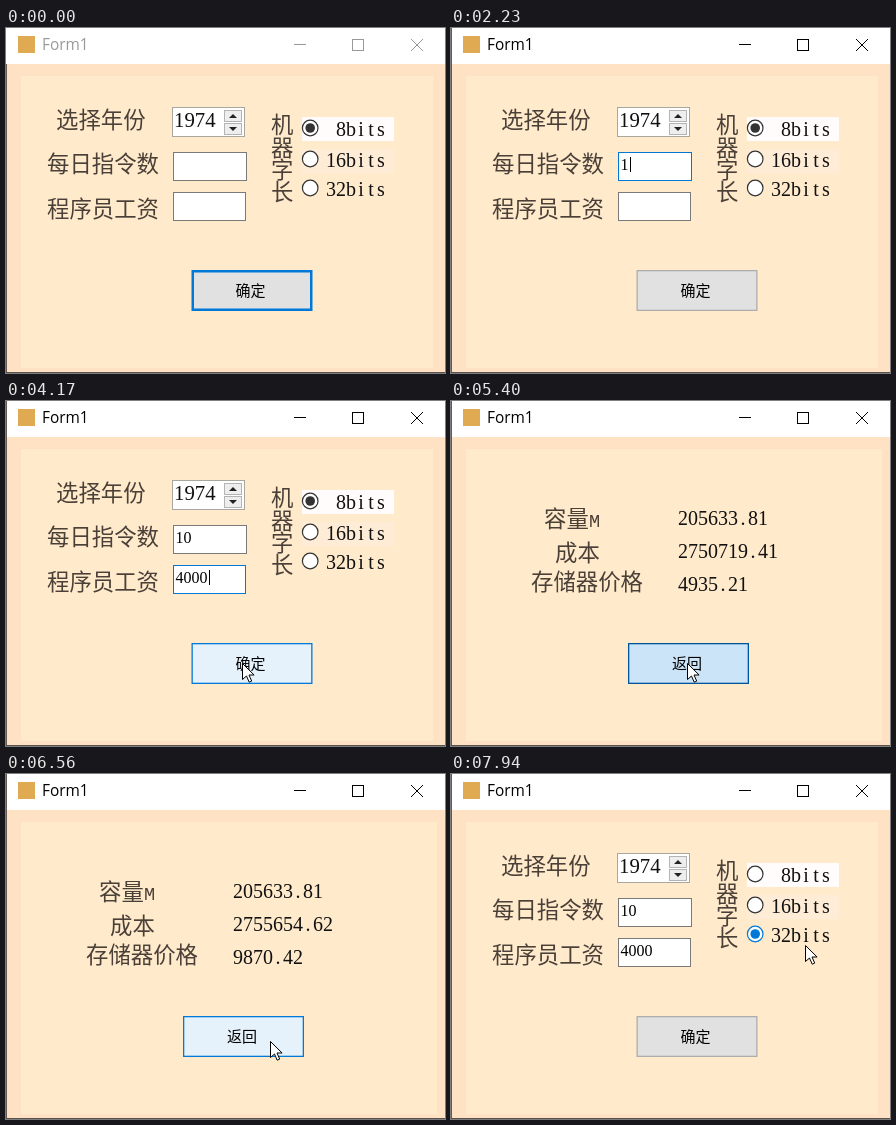
These frames come from a looping animation (439 px wide and 345 px high, 8 s). An HTML page with a canvas:

```html
<!DOCTYPE html>
<html lang="zh">
<head>
<meta charset="utf-8">
<title>Form1</title>
<style>
html, body { margin: 0; width: 100%; height: 100%; overflow: hidden; background: #ffe1c4; }
canvas { display: block; }
</style>
</head>
<body>
<canvas id="stage" width="439" height="345"></canvas>
<script>
const ctx = document.getElementById('stage').getContext('2d');
const LOOP = 8000, TICK = 77.2;
const CJK = '"Noto Sans CJK SC", "Noto Sans CJK", sans-serif';
const MONO = '"Liberation Mono", monospace';
const SERIF = '"Liberation Serif", serif';
const INK = '#4b4038', BLUE = '#0078d7';

// Pointer path: [tick, x, y], eased between neighbours.
const path = [
  [2, 290, 346], [11, 212, 138], [32, 212, 138], [36, 197, 187], [40, 196, 189],
  [47, 196, 189], [54, 236, 262], [71, 236, 262], [75, 340, 148], [77, 345, 135],
  [79, 345, 135], [83, 264, 267], [96, 264, 267], [100, 354, 171]
];

function pointerAt(tick) {
  const next = path.findIndex(p => p[0] > tick);
  if (next < 0) return path[path.length - 1].slice(1);
  if (next === 0) return path[0].slice(1);
  const [t0, x0, y0] = path[next - 1], [t1, x1, y1] = path[next];
  const u = (tick - t0) / (t1 - t0), e = u * u * (3 - 2 * u);
  return [x0 + (x1 - x0) * e, y0 + (y1 - y0) * e];
}

const between = (v, from, to) => v >= from && v < to;
const inside = ([px, py], x, y, w, h) => between(px, x, x + w) && between(py, y, y + h);

function rect(x, y, w, h, fill) {
  ctx.fillStyle = fill;
  ctx.fillRect(x, y, w, h);
}

function frame(x, y, w, h, fill, border, line = 1) {
  rect(x, y, w, h, border);
  rect(x + line, y + line, w - 2 * line, h - 2 * line, fill);
}

function text(str, x, baseline, size, family, color = '#111', weight = 400) {
  ctx.font = `${weight} ${size}px ${family}`;
  ctx.fillStyle = color;
  ctx.fillText(str, x, baseline);
}

// Half-width serif letters, each centred in a cell of equal width.
function cells(str, x, baseline, pitch, color) {
  ctx.textAlign = 'center';
  [...str].forEach((ch, i) => text(ch, x + (i + 0.5) * pitch, baseline, pitch * 2, SERIF, color));
  ctx.textAlign = 'left';
}

const label = (str, x, middle) => text(str, x, middle + 8.4, 22.4, CJK, INK, 300);

function shape(points, fill, stroke) {
  ctx.beginPath();
  points.forEach(([x, y]) => ctx.lineTo(x, y));
  ctx.closePath();
  ctx.fillStyle = fill;
  ctx.fill();
  if (stroke) {
    ctx.strokeStyle = stroke;
    ctx.lineWidth = 1;
    ctx.stroke();
  }
}

function titleBar(active) {
  const color = active ? '#000' : '#999';
  rect(0, 0, 439, 36, '#fff');
  rect(12, 8, 17, 17, '#dfaa52');
  text('Form1', 36, 22, 15.4, '"Open Sans", sans-serif', color);
  rect(288, 16, 12, 1, color);
  frame(346, 11, 12, 12, '#fff', color);
  ctx.strokeStyle = color;
  ctx.lineWidth = 1;
  ctx.beginPath();
  ctx.moveTo(405, 11); ctx.lineTo(417, 23);
  ctx.moveTo(417, 11); ctx.lineTo(405, 23);
  ctx.stroke();
}

function button(caption, x, pointer, pressed, isDefault) {
  const hover = pointer && inside(pointer, x, 242, 121, 41);
  const [fill, border, line] =
    pressed ? ['#cce4f7', '#005499', 1.3] :
    hover ? ['#e5f1fb', BLUE, 1.3] :
    isDefault ? ['#e1e1e1', BLUE, 2.5] : ['#e1e1e1', '#adadad', 1.3];
  frame(x, 242, 121, 41, fill, border, line);
  text(caption, x + 44, 268.3, 15, CJK, '#000', 500);
}

function textBox(y, w, value, focused, caretOn) {
  frame(167, y, w, 29, '#fff', focused ? BLUE : '#7a7a7a');
  cells(value, 169.5, y + 17.5, 8, '#000');
  if (caretOn) rect(Math.round(170.5 + value.length * 8), y + 5, 1, 15, '#000');
}

function yearSpinner() {
  frame(166, 79, 73, 30, '#fff', '#a9a59f');
  cells('1974', 168, 99, 10.4);
  for (const [y, dir] of [[82, -1], [95, 1]]) {
    frame(218, y, 18, 12, '#eeeeee', '#b4b4b4');
    const mid = y + 6;
    shape([[223, mid - 2 * dir], [231, mid - 2 * dir], [227, mid + 2 * dir]], '#222');
  }
}

function radio(y, caption, dot, hover) {
  const color = hover ? BLUE : '#333';
  ctx.beginPath();
  ctx.arc(304.2, y, 7.8, 0, 7);
  ctx.fillStyle = '#fff';
  ctx.fill();
  ctx.strokeStyle = color;
  ctx.lineWidth = 1.2;
  ctx.stroke();
  if (dot) {
    ctx.globalAlpha = dot;
    ctx.beginPath();
    ctx.arc(304.2, y, 4.8, 0, 7);
    ctx.fillStyle = color;
    ctx.fill();
    ctx.globalAlpha = 1;
  }
  cells(caption, 320, y + 8, 10);
}

function inputPage(tick, pointer) {
  const focus = between(tick, 13, 36) ? 1 : between(tick, 36, 59) ? 2 : 0;
  const caret1 = between(tick, 13, 22) || between(tick, 29, 36);
  const caret2 = between(tick, 37, 59);
  const typed = (str, start) => str.slice(0, Math.max(0, tick - start + 1));

  label('选择年份', 50, 92);
  label('每日指令数', 41, 135.5);
  label('程序员工资', 41, 181);
  yearSpinner();
  textBox(124, 74, typed('10', 29), focus === 1, caret1);
  textBox(164, 73, typed('4000', 43), focus === 2, caret2);

  [...'机器字长'].forEach((ch, i) => label(ch, 265, 97 + i * 22.2));
  rect(296, 89, 92, 24, '#fffcfb');
  rect(296, 121, 92, 24, '#ffecd6');
  const selected = tick < 79 ? 0 : tick < 102 ? 1 : 2;
  [100, 131, 160].forEach((y, i) => {
    const fading = tick === 102 && i > 0;
    const hover = pointer && inside(pointer, 296, [88, 119, 147][i], 92, 26);
    radio(y, [' 8bits', '16bits', '32bits'][i], fading ? 0.5 : +(i === selected), hover);
  });
  button('确定', 185.5, pointer, tick === 58 || tick === 84, tick < 13);
}

function resultPage(tick, pointer) {
  const bits = tick < 75 ? 8 : 16;
  const capacity = 4080 * Math.exp(0.28 * 14);
  const price = 0.003 * bits * capacity;
  const cost = capacity / 300 * 4000 + 4000 + price;
  label('容量', 93, 118);
  text('M', 138, 126, 18.6, MONO, INK);
  label('成本', 104, 152);
  label('存储器价格', 80, 181);
  [capacity, cost, price].forEach((v, i) => cells(v.toFixed(2), 227, 124 + i * 33, 10));
  button('返回', 177, pointer, tick === 70 || tick === 95);
}

function arrow(x, y) {
  const outline = [[0, 0], [0, 16], [4, 12.5], [6.7, 18.7], [9.2, 17.6], [6.5, 11.5], [11.6, 11.5]];
  shape(outline.map(([dx, dy]) => [x + dx + 0.5, y + dy + 0.5]), '#fff', '#000');
}

function beam(x, y) {
  x = Math.round(x);
  y = Math.round(y);
  rect(x, y - 7, 1, 14, '#000');
  for (const edge of [y - 8, y + 7]) {
    rect(x - 3, edge, 3, 1, '#000');
    rect(x + 1, edge, 3, 1, '#000');
  }
}

function draw(time) {
  const tick = Math.floor((time + 20) / TICK);
  const onResult = between(tick, 59, 71) || between(tick, 85, 96);
  const hidden = tick < 2 || between(tick, 29, 32) || between(tick, 43, 47);
  const pointer = hidden ? null : pointerAt(tick);

  rect(0, 0, 439, 345, '#ffe1c4');
  rect(15, 48, onResult ? 416 : 412, 292, '#ffeacc');
  titleBar(tick >= 1);
  rect(0, tick < 1 ? 36 : 0, 1, 345, '#655a53');
  rect(0, 344, 439, 1, '#5b514b');
  (onResult ? resultPage : inputPage)(tick, pointer);

  if (pointer) {
    const overText = !onResult && tick < 40 &&
      (inside(pointer, 167, 124, 74, 29) || inside(pointer, 167, 164, 73, 29));
    (overText ? beam : arrow)(...pointer);
  }
}

function loop() {
  draw(performance.now() % LOOP);
  requestAnimationFrame(loop);
}
loop();
</script>
</body>
</html>
```
